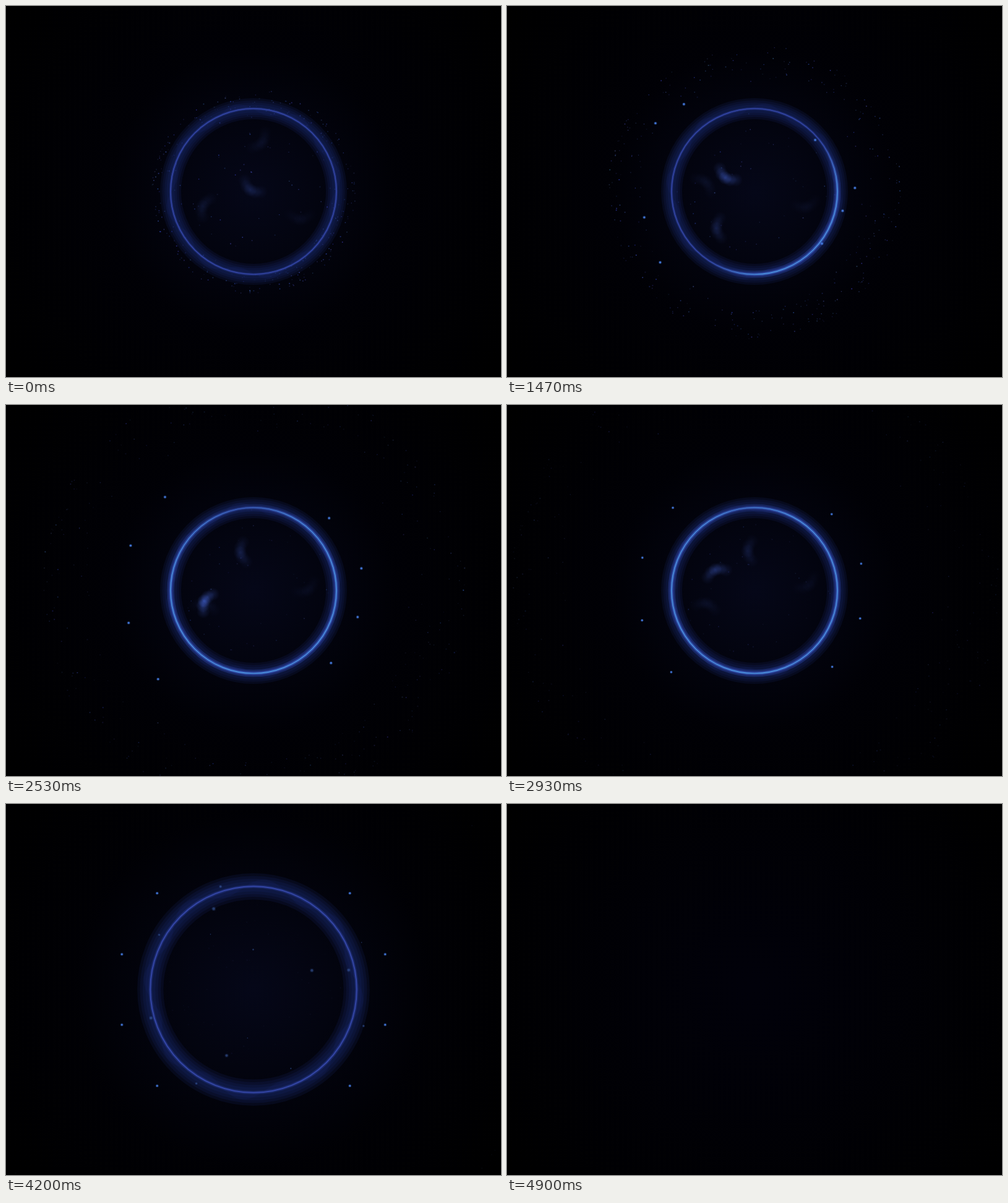
Animation, 800 px wide and 600 px high, one loop 5010 ms. Source, as an HTML page with a canvas:

```html
<!DOCTYPE html>
<html lang="en">
<head>
<meta charset="utf-8">
<title>Glowing ring</title>
<style>
  html, body { margin: 0; width: 100%; height: 100%; overflow: hidden; background: #000; }
  canvas { display: block; width: 800px; height: 600px; }
</style>
</head>
<body>
<canvas id="stage" width="800" height="600"></canvas>
<script>
const ctx = document.getElementById('stage').getContext('2d');
const LOOP = 5010, TAU = Math.PI * 2, RADIUS = 134;
const rad = deg => deg * Math.PI / 180;
const clamp = v => Math.max(0, Math.min(1, v));
const linear = (t, a, b) => clamp((t - a) / (b - a));
const smooth = v => v * v * (3 - 2 * v);
const ramp = (t, a, b) => smooth(linear(t, a, b));
const pulse = (t, at, width) => Math.exp(-(((t - at) / width) ** 2));

let seed = 41;
const random = () => (seed = (seed * 16807) % 2147483647) / 2147483647;
const between = (a, b) => a + (b - a) * random();
const make = (count, build) => Array.from({ length: count }, (_, i) => build(i));

const dust = make(330, i => ({
  angle: random() * TAU,
  spread: 0.72 + 0.28 * Math.sqrt(random()),
  inner: i % 8 === 0 ? between(30, 125) : 0,
  size: between(1, 1.8),
  color: `${between(32, 56)},${between(46, 76)},${between(100, 170)}`,
  phase: random() * TAU
}));

// Four lights settle on each side of the ring, 30 degrees apart
const orbiters = make(8, i => {
  const left = i >= 4;
  return {
    seat: (left ? 180 : 0) + (i % 4) * 30 - 45,
    lag: between(-14, 26),
    from: between(100, 150),
    bulge: left ? 62 : 10
  };
});

const sparks = make(15, () => ({
  angle: random() * TAU,
  r: 155 * Math.sqrt(between(0.1, 1)),
  size: 0.5 + random() ** 3 * 1.6,
  turn: between(-0.2, 0.2)
}));

// Each wisp glides on its own polar path and turns along with it
const wisps = [
  { angle: t => 205 + 55 * ramp(t, 1500, 2900), r: t => 6 + 59 * ramp(t, 0, 2100),
    lean: -170, power: t => 0.2 + 0.5 * pulse(t, 1300, 1100) },
  { angle: t => 164 - 36 * ramp(t, 0, 2130) + 80 * ramp(t, 2130, 2930), r: t => 86 - 28 * ramp(t, 2130, 3730),
    lean: -50, power: t => 0.2 + 0.7 * pulse(t, 2350, 700) },
  { angle: t => -80 - 115 * ramp(t, 0, 2130), r: () => 80, lean: 30, power: () => 0.14 },
  { angle: t => 31 - 41 * ramp(t, 0, 3730), r: () => 88, lean: -31, power: () => 0.1 }
];

function disc(x, y, r, style) {
  ctx.fillStyle = style;
  ctx.beginPath();
  ctx.arc(x, y, r, 0, TAU);
  ctx.fill();
}

function light(angle, r, size, color, alpha) {
  const x = r * Math.cos(angle), y = r * Math.sin(angle);
  disc(x, y, size * 1.6, `rgba(${color},${alpha * 0.3})`);
  disc(x, y, size, `rgba(${color},${alpha})`);
}

function softDisc(x, y, r, color, alpha) {
  const g = ctx.createRadialGradient(x, y, 0, x, y, r);
  g.addColorStop(0, `rgba(${color},${alpha})`);
  g.addColorStop(0.5, `rgba(${color},${alpha * 0.5})`);
  g.addColorStop(1, `rgba(${color},0)`);
  disc(x, y, r, g);
}

function drawDust(t) {
  const reach = 165 + 0.02 * t + 0.00002 * t * t;
  const fade = 0.75 * (1 - 0.8 * ramp(t, 1500, 3700)) * (1 - ramp(t, 3900, 4850));
  for (const p of dust) {
    const r = p.inner ? p.inner + t * 0.004 : reach * p.spread;
    const a = p.angle + 0.06 * Math.sin(t / 900 + p.phase);
    const twinkle = 0.65 + 0.35 * Math.sin(t / 160 + p.phase);
    ctx.fillStyle = `rgba(${p.color},${fade * twinkle})`;
    ctx.fillRect(r * Math.cos(a), r * Math.sin(a), p.size, p.size);
  }
}

function drawWisps(t) {
  const fade = 1 - ramp(t, 3750, 4200);
  for (const w of wisps) {
    const angle = w.angle(t), r = w.r(t), power = w.power(t) * fade;
    ctx.save();
    ctx.translate(r * Math.cos(rad(angle)), r * Math.sin(rad(angle)));
    ctx.rotate(rad(angle + w.lean));
    for (let k = -2; k <= 2; k++) {
      softDisc(k * 8, -k * k * 1.8, 11, '62,92,190', power * (1 - Math.abs(k) / 3.5) * 0.6);
    }
    ctx.restore();
  }
}

// Closed outline with eight soft corners
function wavyPath(r, amount, phase) {
  for (let i = 0; i <= 160; i++) {
    const a = i / 160 * TAU;
    const d = r * (1 + amount * Math.cos(8 * a + phase));
    ctx[i ? 'lineTo' : 'moveTo'](d * Math.cos(a), d * Math.sin(a));
  }
  ctx.closePath();
}

function strokeRing(r, width, style) {
  ctx.lineWidth = width;
  ctx.strokeStyle = style;
  ctx.beginPath();
  ctx.arc(0, 0, r, 0, TAU);
  ctx.stroke();
}

// Stroke style that is strongest around the lit side of the ring
function litStyle(t, color, power) {
  const center = -45 + 125 * ramp(t, 300, 2130);
  const half = 32 + 230 * linear(t, 300, 2750) ** 2;
  const g = ctx.createConicGradient(rad(center + 180), 0, 0);
  for (let i = 0; i <= 48; i++) {
    const away = Math.abs(i / 48 * 360 - 180);
    const a = power * smooth(clamp((half - away) / (half * 0.55)));
    g.addColorStop(i / 48, `rgba(${color},${a})`);
  }
  return g;
}

function drawRing(t, scale, alpha) {
  const r = RADIUS * scale;
  const phase = (t - 4570) / 420;
  const power = ramp(t, 300, 770) * (1 - ramp(t, 3100, 3730));
  ctx.save();
  ctx.globalAlpha = alpha;

  for (let width = 34; width > 6; width -= 7) strokeRing(r, width * scale, 'rgba(30,46,120,.16)');
  ctx.beginPath();
  wavyPath(r, 0.07, phase);
  ctx.arc(0, 0, r, 0, TAU);
  ctx.fillStyle = 'rgba(26,42,110,.16)';
  ctx.fill('evenodd');

  strokeRing(r, 4.5 * scale, 'rgba(42,62,150,.4)');
  strokeRing(r, 1.6 * scale, 'rgb(52,70,166)');
  if (power > 0) {
    strokeRing(r, 11, litStyle(t, '38,56,140', power * 0.5));
    strokeRing(r, 5.5, litStyle(t, '50,80,178', power * 0.7));
    strokeRing(r, 1.7, litStyle(t, '74,142,218', power));
  }
  ctx.restore();
}

function drawOrbiters(t, scale) {
  const alpha = ramp(t, 420, 770) * (1 - ramp(t, 4690, 4860));
  const settle = ramp(t, 600, 3300);
  const swing = Math.sin(Math.PI * linear(t, 770, 3100));
  for (const o of orbiters) {
    const r = o.from + (177 - o.from) * settle + o.bulge * swing;
    const size = 1.4 + 0.3 * swing + 0.7 * (scale - 1);
    light(rad(o.seat + o.lag * (1 - settle)), r * scale, size, '66,118,216', alpha);
  }
}

function drawSparks(t, scale) {
  const alpha = 0.55 * ramp(t, 3300, 4400) * (1 - ramp(t, 4580, 4850));
  for (const s of sparks) {
    light(s.angle + s.turn * (t - 4570) / 1000, s.r * scale, s.size * scale, '60,96,170', alpha);
  }
}

function draw(now) {
  const t = now % LOOP;
  const burst = Math.max(0, t - 3630);
  const scale = 1 + 7.5e-7 * burst * burst;
  const alpha = 1 - ramp(t, 4560, 4800);
  ctx.setTransform(1, 0, 0, 1, 0, 0);
  ctx.fillStyle = '#000';
  ctx.fillRect(0, 0, 800, 600);
  ctx.translate(400, 300);
  ctx.globalCompositeOperation = 'lighter';
  softDisc(0, 0, 500, '1,1,10', 1);
  softDisc(0, 0, 230 * scale, '4,6,14', alpha);
  drawDust(t);
  drawWisps(t);
  ctx.globalCompositeOperation = 'source-over';
  drawRing(t, scale, alpha);
  drawSparks(t, scale);
  drawOrbiters(t, scale);
  requestAnimationFrame(() => draw(performance.now() - start));
}

const start = performance.now();
draw(0);
</script>
</body>
</html>
```
